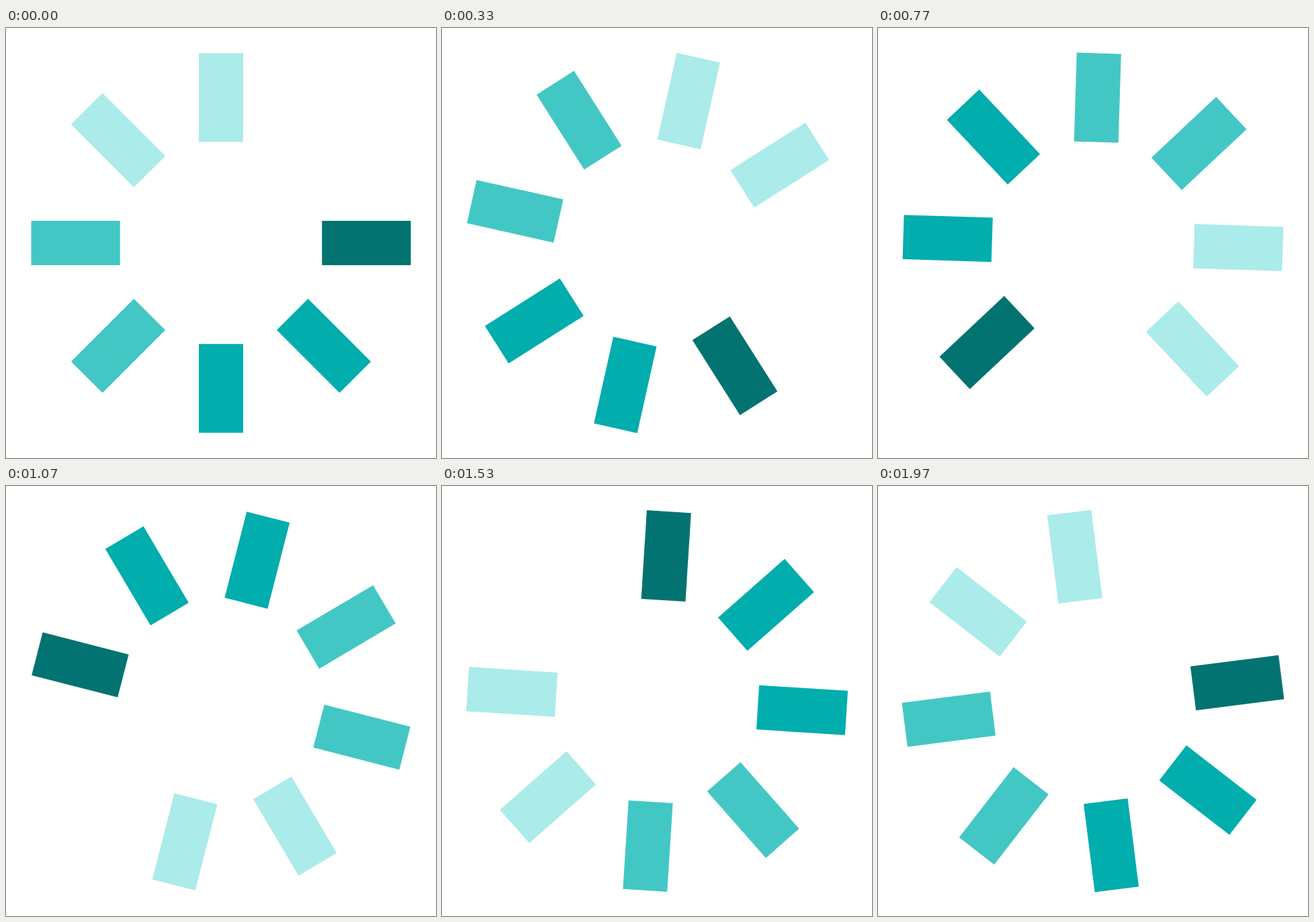
An HTML page that plays this animation: 640 px wide and 640 px high, repeating every 2010 ms.

```html
<!DOCTYPE html>
<html lang="en">
<head>
<meta charset="utf-8">
<title>Spinner</title>
<style>
  html, body { margin: 0; width: 100%; height: 100%; overflow: hidden; background: #fff; }
  svg { display: block; width: 100%; height: 100%; }
</style>
</head>
<body>
<svg viewBox="0 0 640 640"><g id="wheel"></g></svg>
<script>
const LOOP = 2010;
const STEPS = 50;
const COLORS = ['#037371', '#02adad', '#02adad', '#43c7c5', '#43c7c5', '#abebea', '#abebea'];
const wheel = document.getElementById('wheel');

COLORS.forEach((fill, i) => {
  const bar = document.createElementNS('http://www.w3.org/2000/svg', 'rect');
  const attrs = {
    x: 150.3, y: -33, width: 132.2, height: 66, fill,
    transform: `rotate(${i * 45})`
  };
  for (const name in attrs) bar.setAttribute(name, attrs[name]);
  wheel.append(bar);
});

// 25 poses per second, shown on a 30 Hz clock rounded to 10 ms.
const stepStart = step => Math.round(Math.round(step * 1.2) * 10 / 3) * 10;

function stepAt(time) {
  let step = STEPS - 1;
  while (step > 0 && stepStart(step) > time) step--;
  return step;
}

function draw(time) {
  const angle = stepAt(time % LOOP) * 360 / STEPS;
  wheel.setAttribute('transform', `translate(320 320) rotate(${angle})`);
}

const start = performance.now();
function tick() {
  draw(performance.now() - start);
  requestAnimationFrame(tick);
}
tick();
</script>
</body>
</html>
```
